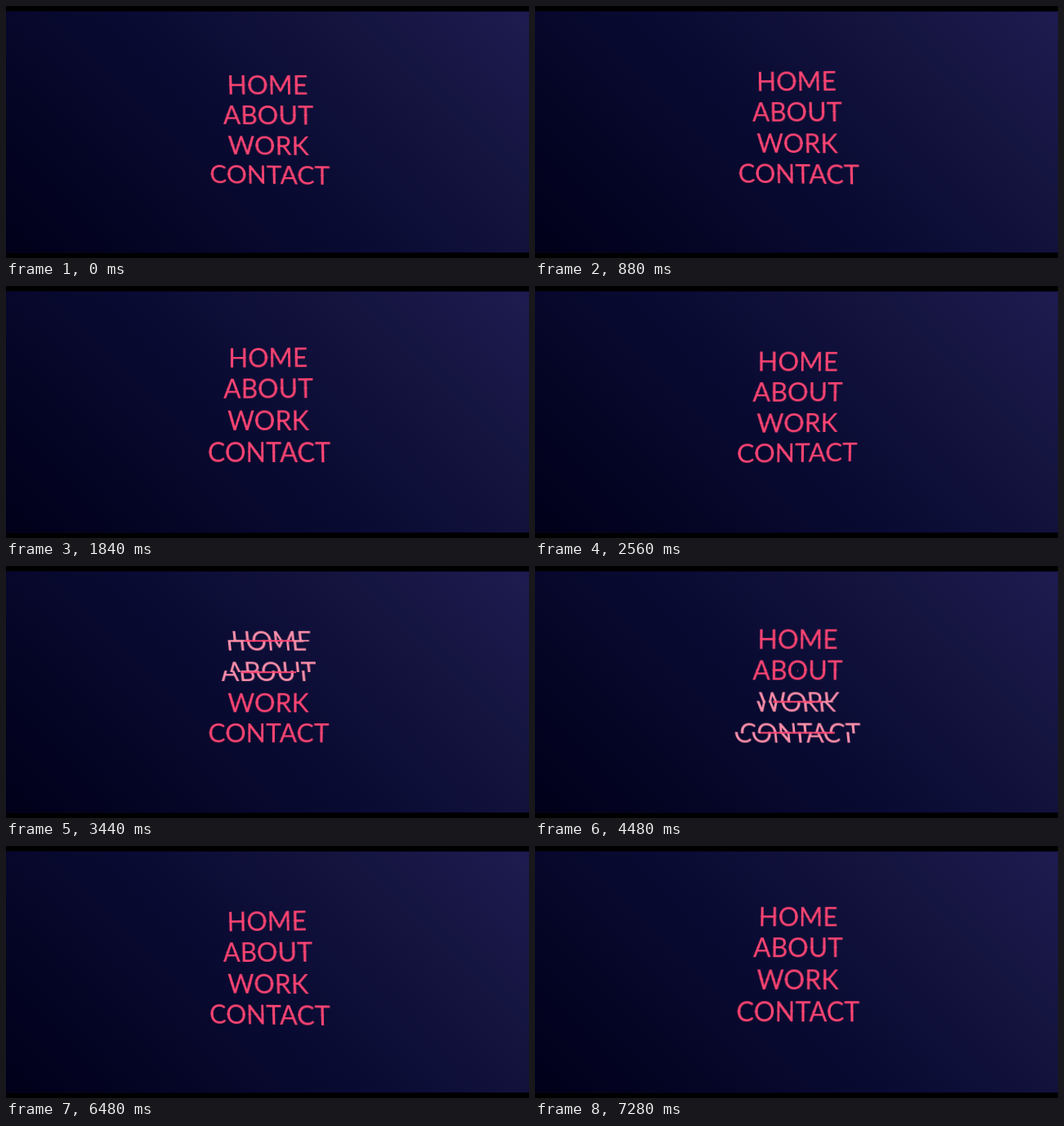
Animation, 640 px wide and 309 px high, one loop 7.36 s. Source, as an HTML page:

```html
<!DOCTYPE html>
<html lang="en">
<head>
<meta charset="utf-8">
<title>Menu</title>
<style>
  :root { --loop: 7360ms; --pink: #ff4472; --pale: #ffdae1; }

  html, body { margin: 0; width: 100%; height: 100%; overflow: hidden; background: #000; }

  .stage {
    position: absolute; left: 0; top: 7px; width: 640px; height: 295px;
    background: linear-gradient(45deg, #00001a, #0a0b33 48%, #14143f 75%, #1e1b50);
    box-shadow: 0 0 0 1px #04041a;
  }

  .menu {
    position: absolute; left: -100px; top: -76.8px; width: 200px; height: 153.6px;
    margin: 0; padding: 0; list-style: none; text-align: center;
    font: 400 32px/38.4px Lato, "Open Sans", sans-serif; color: var(--pink);
    animation: sway var(--loop) linear infinite;
  }
  .menu li { height: 38.4px; white-space: nowrap; }

  .link { position: relative; display: inline-block; height: 38.4px; vertical-align: top; }
  .half { display: block; animation: var(--loop) var(--delay) infinite; }
  /* The halves overlap by a pixel so no seam shows at rest. */
  .upper {
    clip-path: inset(0 -4px calc(50% - 0.5px));
    transform-origin: 50% 25%; animation-name: upper;
  }
  .lower {
    position: absolute; left: 0; top: 0;
    clip-path: inset(calc(50% - 0.5px) -4px 0);
    transform-origin: 50% 75%; animation-name: lower;
  }
  .link::after {
    content: ""; position: absolute; left: -10%; top: calc(50% - 1px); width: 120%; height: 2px;
    background: var(--pink); transform: scaleX(0);
    animation: strike var(--loop) var(--delay) infinite;
  }

  /* Hover: in during the first 520 ms, out over the next 800 ms. */
  @keyframes upper {
    0% { color: var(--pink); transform: skewX(0deg) translateX(0); animation-timing-function: cubic-bezier(.25, 1.08, .58, 1); }
    7.07% { color: var(--pale); transform: skewX(12deg) translateX(5px); animation-timing-function: cubic-bezier(.16, 1.08, .38, .98); }
    17.93%, 100% { color: var(--pink); transform: skewX(0deg) translateX(0); }
  }
  @keyframes lower {
    0% { color: var(--pink); transform: skewX(0deg) translateX(0); animation-timing-function: cubic-bezier(.25, 1.08, .58, 1); }
    7.07% { color: var(--pale); transform: skewX(12deg) translateX(-5px); animation-timing-function: cubic-bezier(.16, 1.08, .38, .98); }
    17.93%, 100% { color: var(--pink); transform: skewX(0deg) translateX(0); }
  }
  @keyframes strike {
    0% { transform: scaleX(0); animation-timing-function: cubic-bezier(.25, 1.08, .58, 1); }
    7.07% { transform: scaleX(1); animation-timing-function: cubic-bezier(.16, 1.08, .38, .98); }
    17.93%, 100% { transform: scaleX(0); }
  }

  /* The whole menu tilts as if following a pointer. */
  @keyframes sway {
    0%     { translate: 320.7px 152.9px; rotate: .4deg; scale: 1 .962; transform: skewX(1.15deg) perspective(500px) rotateY(-3.5deg) rotateX(-5.5deg); }
    4.35%  { translate: 320.7px 152.7px; rotate: .4deg; scale: 1 .964; transform: skewX(1.15deg) perspective(500px) rotateY(-3.5deg) rotateX(-5.2deg); }
    7.61%  { translate: 320.6px 151.4px; rotate: .3deg; scale: 1 .974; transform: skewX(1.1deg) perspective(500px) rotateY(-4.2deg) rotateX(-3deg); }
    13.59% { translate: 320.4px 148.7px; rotate: 0deg; scale: 1 .993; transform: skewX(1deg) perspective(500px) rotateY(-5.5deg) rotateX(1deg); }
    18.48% { translate: 320.3px 146.7px; rotate: -.2deg; scale: 1 1.007; transform: skewX(.95deg) perspective(500px) rotateY(-6deg) rotateX(4deg); }
    24.46% { translate: 320.7px 145.3px; rotate: -.2deg; scale: 1 1.014; transform: skewX(.5deg) perspective(500px) rotateY(-3deg) rotateX(6deg); }
    30.43% { translate: 321.2px 147.4px; rotate: -.2deg; scale: 1 .993; transform: skewX(-.2deg) perspective(500px) rotateY(1.5deg) rotateX(0deg); }
    34.78% { translate: 321.5px 149.3px; rotate: -.3deg; scale: 1 .974; transform: skewX(-.55deg) perspective(500px) rotateY(4deg) rotateX(-3.5deg); }
    41.3%  { translate: 321.4px 149.1px; rotate: -.1deg; scale: 1 .979; transform: skewX(-.4deg) perspective(500px) rotateY(1.5deg) rotateX(-3.2deg); }
    46.74% { translate: 321.2px 149px; rotate: 0deg; scale: 1 .983; transform: skewX(-.25deg) perspective(500px) rotateY(0deg) rotateX(-3deg); }
    60.87% { translate: 321.2px 147.6px; rotate: 0deg; scale: 1 1; transform: skewX(-.25deg) perspective(500px) rotateY(0deg) rotateX(0deg); }
    66.58% { translate: 321.2px 146.6px; rotate: 0deg; scale: 1 1.007; transform: skewX(-.1deg) perspective(500px) rotateY(-.5deg) rotateX(3.5deg); }
    73.91% { translate: 320.9px 147.6px; rotate: 0deg; scale: 1 1.002; transform: skewX(.4deg) perspective(500px) rotateY(-3deg) rotateX(2deg); }
    80.16% { translate: 320.2px 150.4px; rotate: .1deg; scale: 1 .992; transform: skewX(1.2deg) perspective(500px) rotateY(-6deg) rotateX(-1deg); }
    88.04% { translate: 319.9px 149.9px; rotate: 0deg; scale: 1 .998; transform: skewX(1.3deg) perspective(500px) rotateY(-7deg) rotateX(0deg); }
    93.75% { translate: 320.9px 145.3px; rotate: 0deg; scale: 1 1.014; transform: skewX(.4deg) perspective(500px) rotateY(-3deg) rotateX(6deg); }
    98.91%, 100% { translate: 321.7px 144.3px; rotate: 0deg; scale: 1 1.018; transform: skewX(-.25deg) perspective(500px) rotateY(0deg) rotateX(7deg); }
  }
</style>
</head>
<body>
<div class="stage"></div>
<ul class="menu">
  <li><span class="link" style="--delay: 2840ms"><span class="half upper">HOME</span><span class="half lower" aria-hidden="true">HOME</span></span></li>
  <li><span class="link" style="--delay: 3360ms"><span class="half upper">ABOUT</span><span class="half lower" aria-hidden="true">ABOUT</span></span></li>
  <li><span class="link" style="--delay: 3880ms"><span class="half upper">WORK</span><span class="half lower" aria-hidden="true">WORK</span></span></li>
  <li><span class="link" style="--delay: 4400ms"><span class="half upper">CONTACT</span><span class="half lower" aria-hidden="true">CONTACT</span></span></li>
</ul>
</body>
</html>
```
